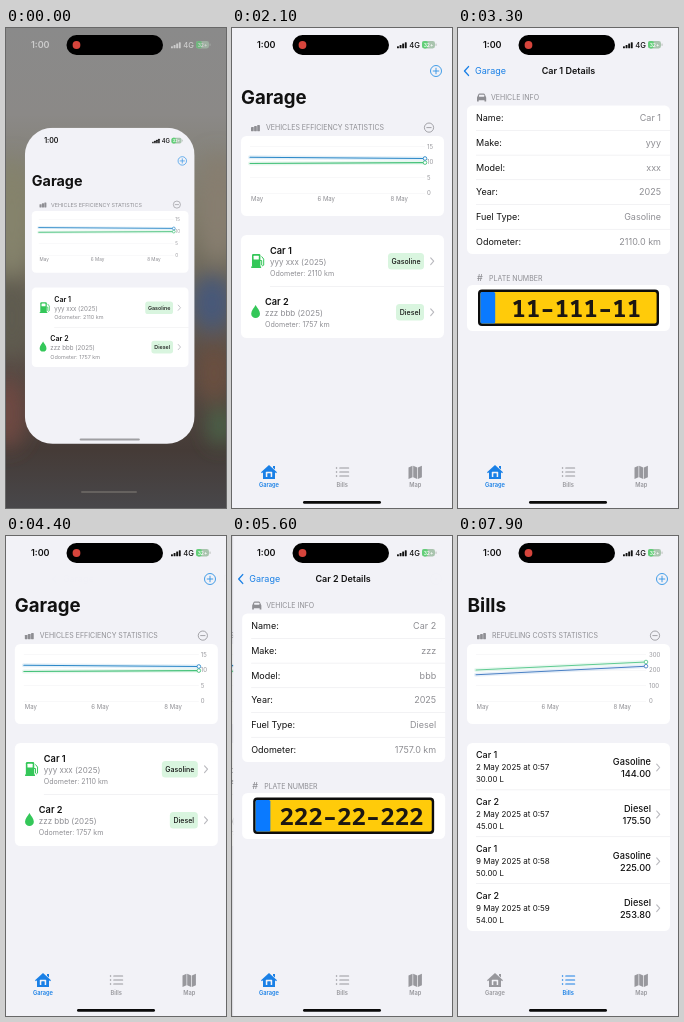
Recreate the animation shown at these times as an HTML page. Size 220x480 px, loop 8000 ms.

```html
<!DOCTYPE html>
<html lang="en">
<head>
<meta charset="utf-8">
<title>Garage</title>
<style>
html, body { margin: 0; width: 100%; height: 100%; overflow: hidden; background: #f2f2f7; }
svg { display: block; width: 100vw; height: 100vh; font-family: Inter, "Liberation Sans", sans-serif; }
text { white-space: pre; }
</style>
</head>
<body>
<svg id="stage" viewBox="0 0 220 480"></svg>
<script>
const BLUE = '#1a80e6', GREEN = '#34c759', GRAY = '#8e8e93', INK = '#111', PAGE = '#f2f2f7';
const LOOP = 8000, BILLS_AT = 7000;
const VISITS = [{ push: 2310, pop: 3850 }, { push: 5110, pop: 6000 }];

// y is the middle of the capitals
const text = (s, x, y, size, o = {}) =>
  `<text x="${x}" y="${y + size * 0.364}" font-size="${size}" font-weight="${o.w || 400}" fill="${o.c || INK}"` +
  ` text-anchor="${o.a || 'start'}"${o.f ? ` font-family="${o.f}"` : ''}>${s}</text>`;
const rect = (x, y, w, h, fill, r = 0) =>
  `<rect x="${x}" y="${y}" width="${w}" height="${h}" rx="${r}" fill="${fill}"/>`;
const line = (d, c, w = 1, more = '') =>
  `<path d="${d}" fill="none" stroke="${c}" stroke-width="${w}" stroke-linecap="round" stroke-linejoin="round" ${more}/>`;
const shape = (d, c) => `<path d="${d}" fill="${c}"/>`;
const ring = (x, y, r, c, w, fill = 'none') =>
  `<circle cx="${x}" cy="${y}" r="${r}" fill="${fill}" stroke="${c}" stroke-width="${w}"/>`;
const group = (id, body) => `<g id="${id}">${body}</g>`;
const card = (y, h) => rect(9, y, 203, h, '#fff', 5.5);
const rule = (x, y) => rect(x, y - 0.25, 212 - x, 0.5, '#e4e4e8');
const chevron = y => line(`M198.7 ${y - 3.4}l3 3.4l-3 3.4`, '#b9b9be', 1.1);

const status = c =>
  text('1:00', 25, 17, 9, { w: 600, c }) +
  [0, 1, 2, 3].map(i => rect(165 + i * 2.6, 18.2 - i * 1.3, 1.9, 2 + i * 1.3, c, 0.5)).join('') +
  text('4G', 177.3, 17, 7.6, { w: 500, c }) +
  rect(190, 13, 13, 7.4, '#a9c4ae', 2.3) + rect(190, 13, 6, 7.4, '#62cf78', 2.3) +
  rect(203.6, 15.4, 0.9, 2.6, '#b4bab5', 0.4) +
  text('32+', 196.5, 16.8, 5, { w: 600, c: '#fff', a: 'middle' });

function chart(heading, ticks, tickX, days, endX, series) {
  const ys = [118.5, 134, 149.5, 165];
  let out = [0, 1, 2].map(i => rect(19 + i * 3.1, 99 - i, 2.7, 4.2 + i, GRAY, 0.4)).join('') +
    text(heading, 34, 99.7, 7, { c: GRAY }) +
    ring(197, 99.6, 4.6, GRAY, 0.8) + line('M194.8 99.6h4.4', GRAY, 0.8) + card(108, 80);
  ys.forEach((y, i) => {
    out += rect(18, y, endX - 18, 0.4, '#ececef') + text(ticks[i], tickX, y, 6, { c: '#99999e' });
  });
  for (const [s, x] of days) out += text(s, x, 171, 6, { c: GRAY });
  for (const [c, y0, y1] of series) {
    const d = `M18 ${y0}L${endX} ${y1}`;
    out += line(d, c, 4, 'opacity=".13"') + line(d, c, 1.1);
  }
  for (const [c, , y] of series) out += ring(endX, y, 1.8, c, 0.9, '#fff');
  return out;
}

function carRow(y, x, name, model, odometer, fuel, badgeX) {
  return text(name, x, y, 9.2, { w: 600 }) + text(model, x, y + 12, 8, { c: GRAY }) +
    text(odometer, x, y + 23, 7.1, { c: GRAY }) +
    rect(badgeX, y + 2.5, 192 - badgeX, 16.5, '#d9f5df', 3.5) +
    text(fuel, (badgeX + 192) / 2, y + 10.7, 7, { w: 500, a: 'middle' }) + chevron(y + 10.7);
}

const pump = rect(20, 226, 8.4, 13, GREEN, 1.3) + rect(21.6, 227.8, 5.2, 3.6, '#fff', 0.5) +
  rect(19.2, 238.3, 10, 1.8, GREEN, 0.7) +
  line('M28.5 232.5h1.2v4.6q1.2 1.5 2 0v-6l-1.9-2.4', GREEN, 1);
const drop = shape('M23.6 277c1.6 3 4.4 5.5 4.4 8.7a4.4 4.4 0 0 1-8.8 0c0-3.2 2.8-5.7 4.4-8.7z', GREEN);

const garage =
  chart('VEHICLES EFFICIENCY STATISTICS', [15, 10, 5, 0], 195,
    [['May', 19], ['6 May', 85.5], ['8 May', 158.5]], 193,
    [['#45c27a', 135.5, 134.6], ['#2b88c8', 129.3, 130.5]]) +
  card(207, 103) + rule(38, 258.5) + pump + drop +
  carRow(222.5, 38, 'Car 1', 'yyy xxx (2025)', 'Odometer: 2110 km', 'Gasoline', 156) +
  carRow(273.5, 33, 'Car 2', 'zzz bbb (2025)', 'Odometer: 1757 km', 'Diesel', 164);

const bill = ([name, date, litres, fuel, cost], i) => {
  const y = 219 + i * 46.9, right = { w: 500, a: 'end' };
  return (i ? rule(18, y - 12) : '') + text(name, 18, y, 9, { w: 500 }) +
    text(date, 18, y + 12, 8) + text(litres, 18, y + 24, 7.8) +
    text(fuel, 193, y + 6.8, 9.2, right) + text(cost, 193, y + 19, 9.2, right) + chevron(y + 12.5);
};
const bills =
  text('Bills', 9.5, 69, 19, { w: 700 }) +
  chart('REFUELING COSTS STATISTICS', [300, 200, 100, 0], 191,
    [['May', 18.5], ['6 May', 83.5], ['8 May', 155.5]], 188,
    [['#5fcb92', 134, 126], ['#4a80c4', 138.8, 130.2]]) +
  card(207, 188) + [
    ['Car 1', '2 May 2025 at 0:57', '30.00 L', 'Gasoline', '144.00'],
    ['Car 2', '2 May 2025 at 0:57', '45.00 L', 'Diesel', '175.50'],
    ['Car 1', '9 May 2025 at 0:58', '50.00 L', 'Gasoline', '225.00'],
    ['Car 2', '9 May 2025 at 0:59', '54.00 L', 'Diesel', '253.80']
  ].map(bill).join('');

function details(values, plate) {
  const carIcon = shape('M19 69.5l1.4-3.2q.3-.8 1.2-.8h4q.9 0 1.2.8l1.4 3.2v4h-1.7v-1.2h-5.8v1.2H19z', GRAY) +
    rect(21, 66.7, 5.2, 2, PAGE, 0.5);
  let out = rect(0, 0, 220, 480, PAGE) + carIcon + text('VEHICLE INFO', 33, 69.5, 7, { c: GRAY }) + card(77.5, 148.5);
  ['Name:', 'Make:', 'Model:', 'Year:', 'Fuel Type:', 'Odometer:'].forEach((label, i) => {
    const y = 90 + i * 24.7;
    out += (i ? rule(18, y - 12.3) : '') + text(label, 18, y, 9) +
      text(values[i], 203, y, 9, { c: GRAY, a: 'end' });
  });
  return out + text('#', 19, 250, 9, { c: GRAY, w: 500 }) + text('PLATE NUMBER', 31, 250, 7, { c: GRAY }) +
    card(257, 46) + rect(20, 261.5, 181, 36.5, '#0c0c0c', 4) +
    rect(22.4, 263.9, 176.2, 31.7, '#ffcb0a', 2) + rect(22.4, 263.9, 14.8, 31.7, '#0a7aff', 1.5) +
    text(plate, 118.3, 279.8, 24, { w: 600, a: 'middle', c: '#1c1712', f: "'Noto Sans Mono', monospace" });
}

function tabs(active) {
  const c = i => i === active ? BLUE : '#98989d';
  const label = (s, i) => text(s, 37 + i * 73.2, 457, 5.7, { w: 600, c: c(i), a: 'middle' });
  const house = shape('M29 444.3L37 437l8 7.3l-.9 1l-1.1-1v6.7H31v-6.7l-1.1 1zM41 438h2v3.5l-2-1.8z', c(0)) +
    rect(33.8, 443.8, 6.4, 5.2, PAGE, 0.6) + rect(35.3, 445.2, 3.4, 3.8, c(0), 0.5);
  const list = [440, 444, 448].map(y =>
    ring(104.6, y, 0.5, c(1), 0.8) + line(`M107.8 ${y}h8.8`, c(1), 1.2)).join('');
  const map = shape('M176.5 439.5l4-1.7v11.4l-4 1.7zM181.2 437.8l4 1.7v11.4l-4-1.7zM185.9 439.5l4-1.7v11.4l-4 1.7z', c(2));
  return house + list + map + label('Garage', 0) + label('Bills', 1) + label('Map', 2);
}

const blob = (x, y, rx, ry, c) => `<ellipse cx="${x}" cy="${y}" rx="${rx}" ry="${ry}" fill="${c}"/>`;
const wallpaper =
  rect(0, 0, 220, 480, 'url(#wall)') + '<g filter="url(#soft)">' +
  blob(6, 190, 20, 60, '#85836c') + blob(6, 290, 22, 40, '#5f5b50') + blob(2, 385, 18, 36, '#704a42') +
  blob(212, 180, 20, 55, '#877e70') + blob(206, 275, 20, 28, '#46597a') + blob(208, 345, 18, 30, '#6a5040') +
  blob(214, 398, 12, 20, '#4c664a') + '</g>' +
  rect(75, 463, 56, 2, '#66625f', 1) + `<g opacity=".65">${status('#f0f0f0')}</g>`;

const $ = id => document.getElementById(id);
$('stage').innerHTML =
  `<defs>
    <linearGradient id="wall" x2="0" y2="1">
      <stop offset="0" stop-color="#8a8a8a"/><stop offset=".18" stop-color="#8b8987"/>
      <stop offset=".4" stop-color="#7b7866"/><stop offset=".7" stop-color="#574c45"/>
      <stop offset=".88" stop-color="#453b37"/><stop offset="1" stop-color="#48474a"/>
    </linearGradient>
    <filter id="soft" x="-30%" y="-30%" width="160%" height="160%"><feGaussianBlur stdDeviation="10"/></filter>
    <clipPath id="frame"><rect id="window" width="220"/></clipPath>
  </defs>` +
  group('back', wallpaper) +
  `<g id="app"><g clip-path="url(#frame)">` + rect(0, 0, 220, 480, PAGE) +
  group('garage', garage) + group('dim', rect(0, 0, 220, 480, '#000')) +
  group('car0', details(['Car 1', 'yyy', 'xxx', '2025', 'Gasoline', '2110.0 km'], '11–111–11')) +
  group('car1', details(['Car 2', 'zzz', 'bbb', '2025', 'Diesel', '1757.0 km'], '222–22–222')) +
  group('bills', bills) +
  group('heading', text('Garage', 9, 69, 18.6, { w: 700 })) +
  group('plus', ring(204, 43, 5.5, '#2f93e6', 0.9) + line('M201.2 43h5.6M204 40.2v5.6', '#2f93e6', 0.9)) +
  group('backLink', line('M10.5 38.6l-4 4.4l4 4.4', BLUE, 1.4) + text('Garage', 17, 43, 9, { c: BLUE })) +
  group('title0', text('Car 1 Details', 110.5, 43, 9, { w: 600, a: 'middle' })) +
  group('title1', text('Car 2 Details', 110.5, 43, 9, { w: 600, a: 'middle' })) +
  group('tab0', tabs(0)) + group('tab1', tabs(1)) + status(INK) +
  group('home', rect(71, -7, 78, 2.8, '#0a0a0a', 1.4)) + '</g></g>' +
  rect(60.5, 7, 96.5, 20, '#000', 10) + `<circle cx="70.5" cy="17" r="3.9" fill="#d6453c"/>`;

const show = (id, on) => $(id).style.display = on ? '' : 'none';
const fade = (id, v) => $(id).setAttribute('opacity', v);
const move = (id, x, y = 0) => $(id).setAttribute('transform', `translate(${x} ${y})`);

// Critically damped spring from 1 to 0
function spring(ms) {
  if (ms <= 0) return 1;
  const x = ms * 0.015, v = (1 + x) * Math.exp(-x);
  return v < 0.001 ? 0 : v;
}

function draw(t) {
  // Opening zoom
  let p = Math.exp(-t / 130);
  if (p < 0.003) p = 0;
  const height = 480 - 71 * p;
  $('app').setAttribute('transform', `translate(${19 * p} ${100.5 * p}) scale(${1 - 0.23 * p})`);
  $('window').setAttribute('height', height);
  $('window').setAttribute('rx', p ? 24 + 12 * p : 0);
  move('home', 0, height);
  fade('home', 1 - 0.65 * p);
  show('back', p > 0);

  // Detail pages: away is 1 on the list and 0 on a detail page
  let away = 1;
  VISITS.forEach(({ push, pop }, i) => {
    const q = t < pop ? spring(t - push) : 1 - spring(t - pop);
    const on = q < 1;
    show('car' + i, on);
    show('title' + i, on);
    if (!on) return;
    away = q;
    move('car' + i, 220 * q);
    move('title' + i, 110 * q);
    fade('title' + i, 1 - q);
  });
  const onBills = t >= BILLS_AT;
  move('garage', -66 * (1 - away));
  move('heading', -66 * (1 - away));
  move('backLink', 40 * away);
  fade('dim', 0.1 * (1 - away));
  fade('heading', Math.max(0, 2 * away - 1));
  fade('plus', away);
  fade('backLink', 1 - away);
  show('garage', !onBills);
  show('heading', !onBills);
  show('bills', onBills);
  show('tab0', !onBills);
  show('tab1', onBills);
}

const start = performance.now();
function tick() {
  draw((performance.now() - start) % LOOP);
  requestAnimationFrame(tick);
}
tick();
</script>
</body>
</html>
```
